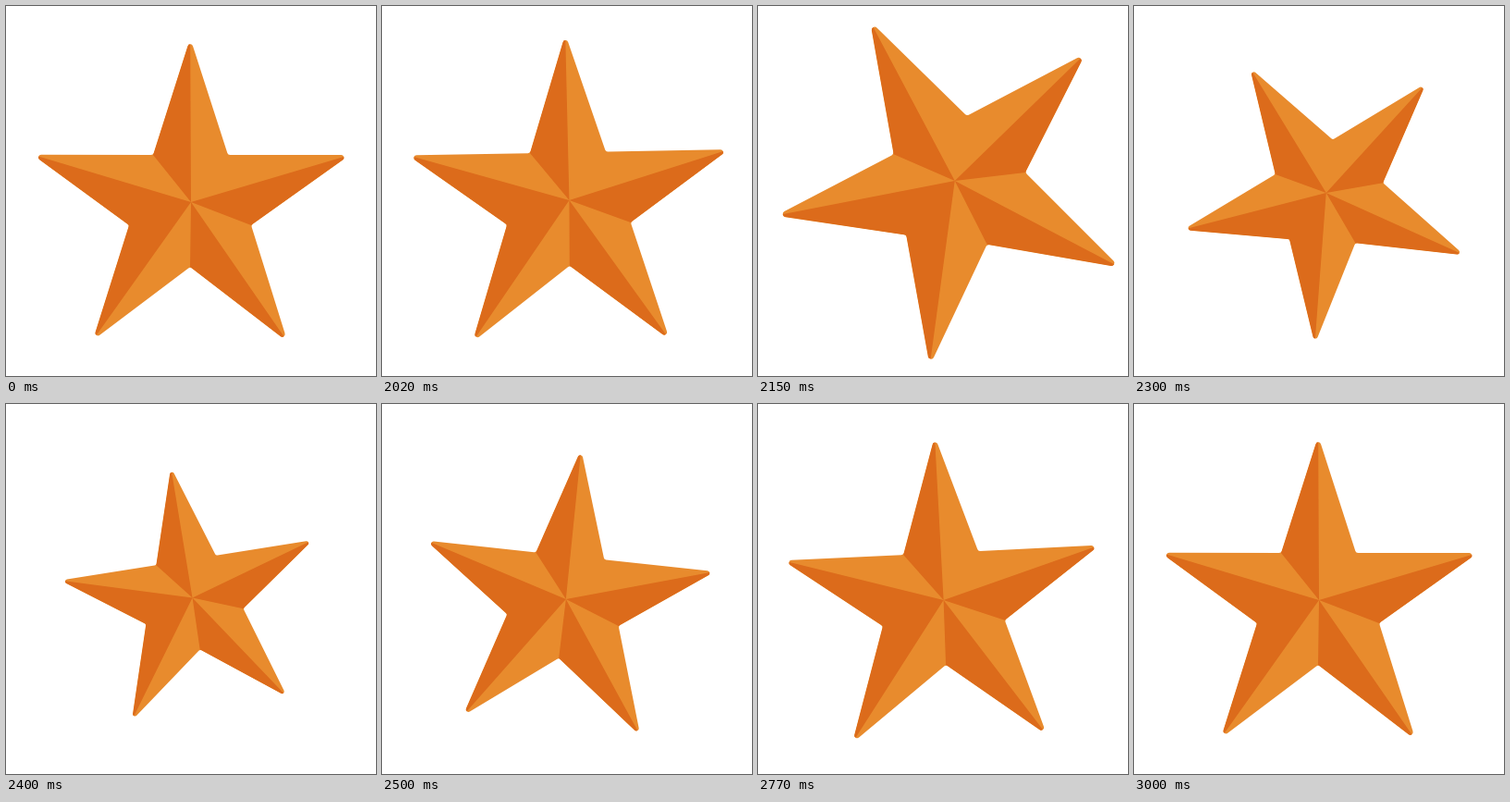
An HTML page for the animation above (3020 ms loop, 400 px wide and 400 px high).

```html
<!DOCTYPE html>
<html lang="en">
<head>
<meta charset="utf-8">
<title>Star</title>
<style>
  html, body { margin: 0; width: 100%; height: 100%; overflow: hidden; background: #fff; }
  svg { display: block; width: 100%; height: 100%; }
</style>
</head>
<body>
<svg viewBox="0 0 400 400">
  <clipPath id="clip"><path id="outline"/></clipPath>
  <g id="star">
    <use href="#outline" fill="#e88b2d"/>
    <path id="shade" fill="#dc6b1b" clip-path="url(#clip)"/>
  </g>
</svg>
<script>
const LOOP = 3020, STEP = 25, REST_STEPS = 80, LAST_STEP = 40, PIVOT = 200;
const byId = id => document.getElementById(id);

// Tips and notches in turn, clockwise from the top tip.
const hub = [200, 212];
const points = [
  [199.2, 34.5], [240, 161], [371.7, 161], [265, 237], [304.3, 362.9],
  [199, 282], [93.8, 361.4], [133, 237], [28.8, 160.7], [159, 161]
];
const darkFacets = [2, 4, 6, 7, 9];
const next = i => points[(i + 1) % points.length];

function toward([x, y], [tx, ty], distance) {
  const f = distance / Math.hypot(tx - x, ty - y);
  return [x + (tx - x) * f, y + (ty - y) * f];
}

function roundedOutline(radius) {
  return points.map((p, i) => {
    const a = points.at(i - 1), b = next(i);
    const turn = Math.atan2(b[1] - p[1], b[0] - p[0]) - Math.atan2(p[1] - a[1], p[0] - a[0]);
    const cut = radius * Math.abs(Math.tan(turn / 2));
    const sweep = i % 2 ? 0 : 1;
    return `${i ? 'L' : 'M'}${toward(p, a, cut)}A${radius} ${radius} 0 0 ${sweep} ${toward(p, b, cut)}`;
  }).join('') + 'Z';
}

byId('outline').setAttribute('d', roundedOutline(3));
byId('shade').setAttribute('d', darkFacets.map(i => `M${hub}L${points[i]}L${next(i)}Z`).join(''));

// Step, shift x, shift y, rotation, scale.
const keys = [
  [0, 0, 0, 0, 1],
  [1, 2.2, -2.2, -1.1, 1.013],
  [4, 8, -19, -15.5, 1.083],
  [6, 6.6, -22.7, -27.7, 1.1016],
  [9, 4.4, -15.5, -36.5, 1.01],
  [12, 2.2, -7.1, -31.1, 0.895],
  [16, 0, 0, -9.1, 0.807],
  [21.5, 0, 0, 8, 0.957],
  [25, 0, 0, 3.3, 0.996],
  [29.5, 0, 0, -3, 1],
  [LAST_STEP, 0, 0, 0, 1]
];

const slope = (i, c) => (keys[i + 1][c] - keys[i][c]) / (keys[i + 1][0] - keys[i][0]);

// Flat at turning points, harmonic mean of both slopes elsewhere.
function tangent(i, c) {
  if (i === 0 || i === keys.length - 1) return 0;
  const a = slope(i - 1, c), b = slope(i, c);
  return a * b > 0 ? 2 * a * b / (a + b) : 0;
}

function valueAt(step, c) {
  let i = 0;
  while (i < keys.length - 2 && step >= keys[i + 1][0]) i++;
  const from = keys[i], to = keys[i + 1];
  const span = to[0] - from[0], u = (step - from[0]) / span, v = 1 - u;
  return v * v * (1 + 2 * u) * from[c] + u * u * (3 - 2 * u) * to[c]
    + span * u * v * (v * tangent(i, c) - u * tangent(i + 1, c));
}

function render(ms) {
  const tick = Math.floor((ms % LOOP) / 10) * 10;
  const step = Math.min(LAST_STEP, Math.max(0, Math.floor((tick + 5) / STEP) - REST_STEPS));
  const [x, y, angle, scale] = [1, 2, 3, 4].map(c => valueAt(step, c));
  byId('star').setAttribute('transform',
    `translate(${PIVOT + x} ${PIVOT + y}) rotate(${angle}) scale(${scale}) translate(${-PIVOT} ${-PIVOT})`);
}

const start = performance.now();
function frame() {
  render(performance.now() - start);
  requestAnimationFrame(frame);
}
frame();
</script>
</body>
</html>
```
